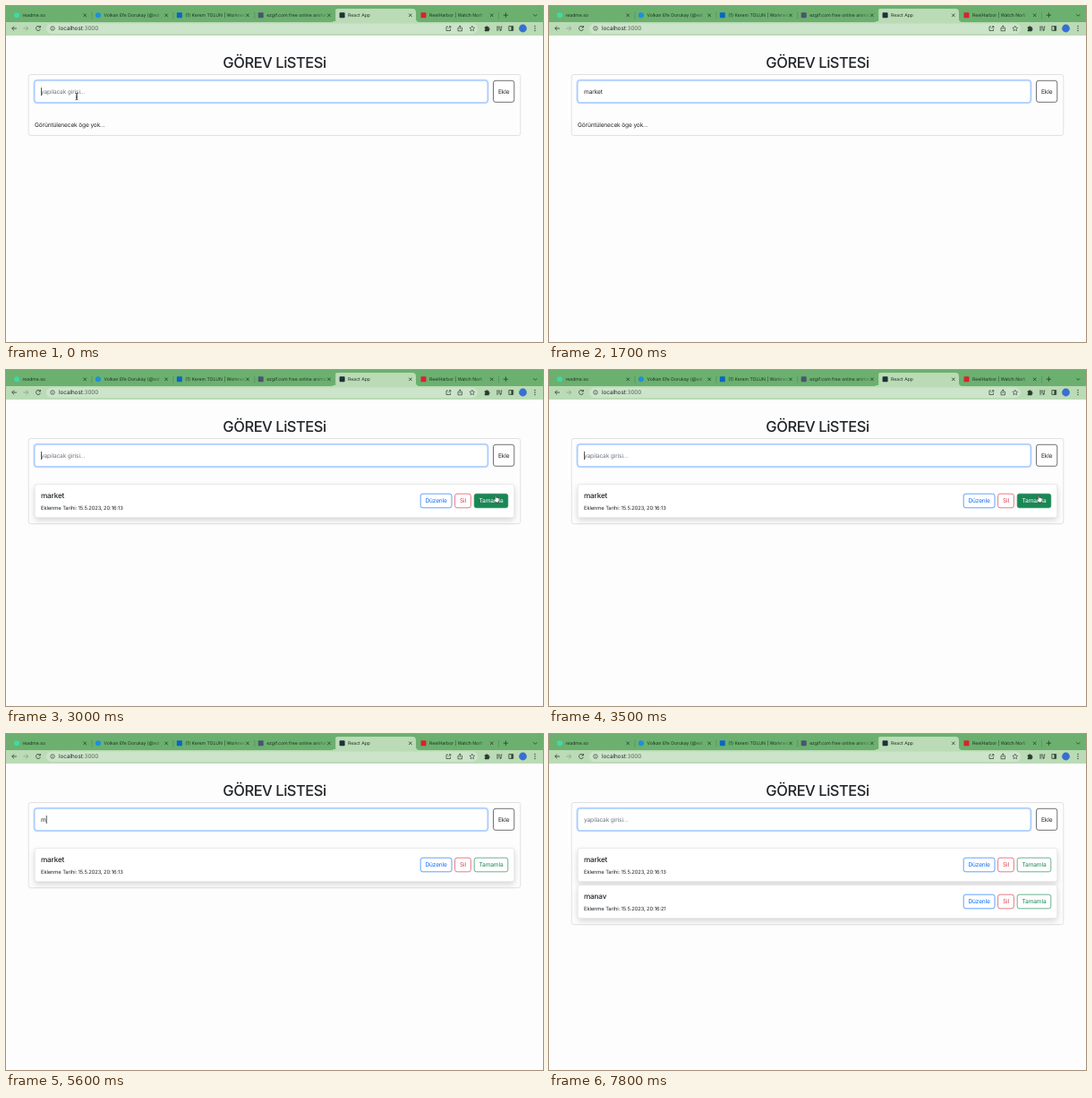
Write an HTML page that moves like this. It is 600 by 375 pixels and loops after 8000 ms.

```html
<!DOCTYPE html>
<html lang="tr">
<head>
<meta charset="utf-8">
<style>
html, body { margin: 0; height: 100%; overflow: hidden; background: #fdfdfd; }
svg { display: block; width: 100vw; height: 100vh; }
text { font: 6.6px Inter, "Open Sans", sans-serif; letter-spacing: -.022em; fill: #212529; text-rendering: geometricPrecision; white-space: pre; }
.tab { font-size: 5.1px; letter-spacing: 0; fill: #1d3020; }
.title { font-size: 16.5px; font-weight: 500; letter-spacing: -.028em; }
.task { font-size: 8.2px; font-weight: 500; }
.date { font-size: 5.85px; }
.mid { text-anchor: middle; }
.icon { fill: none; stroke: #2b3a2c; stroke-width: .8; }
.card { filter: drop-shadow(0 3.3px 3.3px rgba(0, 0, 0, .15)); }
</style>
</head>
<body>
<svg viewBox="0 0 600 375">
  <defs>
    <linearGradient id="fade"><stop stop-color="#6bb06f" stop-opacity="0"/><stop offset=".75" stop-color="#6bb06f"/></linearGradient>
  </defs>
  <rect width="600" height="375" fill="#fdfdfd"/>
  <rect width="600" height="18" fill="#6bb06f"/>
  <rect y="18" width="600" height="15" fill="#badbb6"/>
  <path d="M363 18q4 0 4-4V7q0-4 4-4H454q4 0 4 4v7q0 4 4 4z" fill="#badbb6"/>
  <g id="tabs"></g>
  <rect x="45" y="19.5" width="482" height="11.5" rx="5.75" fill="#cce4c9"/>
  <text x="59" y="27.4" style="font-size:6.4px;letter-spacing:-.01em">localhost<tspan fill="#5c6e5c">:3000</tspan></text>
  <g class="icon">
    <path d="M558.4 7.5v5.4M555.7 10.2h5.4M589.3 9.3l2 2 2-2"/>
    <path d="M12 25H6.7m2.4-2.4L6.7 25l2.4 2.4"/>
    <path d="M19.5 25h5.3m-2.4-2.4l2.4 2.4-2.4 2.4" stroke="#84a083"/>
    <path d="M38 23.4a2.5 2.5 0 1 0 .4 2.4M38.4 22v2h-2"/>
    <circle cx="52" cy="25" r="2.3" stroke-width=".6"/><path d="M52 24.6v1.8M52 23.4v.6" stroke-width=".6"/>
    <path d="M494 23h-2v4.5h4.5v-2M495 22.7h1.8v1.8M496.700 22.800l-2.500 2.500" stroke-width=".7"/>
    <path d="M506 24.200h-1v3.600h4.500v-3.600h-1M507.250 26v-4m-1.300 1.200l1.300-1.200 1.300 1.200" stroke-width=".7"/>
    <path d="M520.800 22.200l.9 1.900 2 .2-1.500 1.400.4 2-1.800-1-1.800 1 .4-2-1.500-1.400 2-.2z" stroke-width=".6"/>
    <path d="M535 23.500h1.300a.9.9 0 0 1 1.800 0h1.300v1.400a.9.9 0 0 1 0 1.800V28H535v-1.400a.8.8 0 0 0 0-1.600z" fill="#2b3a2c" stroke-width=".5"/>
    <path d="M548 23.200h4M548 25.100h4M548 27h2.300M553.200 27v-4h1.200"/><circle cx="552.400" cy="27" r=".6"/>
    <path d="M561.900 22.600h4.800v4.800h-4.800z"/><path d="M565.400 22.600v4.800" stroke-width="1.800"/>
    <path d="M591 22.500v.01M591 25v.01M591 27.500v.01" stroke-width="1.300" stroke-linecap="round"/>
  </g>
  <circle cx="577.500" cy="25" r="4.400" fill="#386fd0"/>

  <text class="title mid" x="300" y="69">GÖREV LiSTESi</text>
  <rect id="panel" x="25.200" y="76.500" width="549.600" rx="2.500" fill="none" stroke="#cfcfcf" stroke-width=".6"/>
  <rect x="32" y="83.200" width="506" height="24.500" rx="2.700" fill="#fff" stroke="#c2dbfe" stroke-width="3"/>
  <rect x="32" y="83.200" width="506" height="24.500" rx="2.700" fill="#fff" stroke="#86b7fe" stroke-width=".7"/>
  <text id="entry" x="39" y="98"></text>
  <rect id="caret" y="91" width=".7" height="9" fill="#111"/>
  <text id="empty" x="32" y="135">Görüntülenecek öge yok...</text>
  <g id="items"></g>
  <g id="buttons"></g>
  <g id="pointer" stroke-linejoin="round">
    <path id="beam" d="M-1.500-3.800q1.500 0 1.500 1.100V2.700q0 1.100-1.500 1.100M1.500-3.800Q0-3.800 0-2.700V2.700q0 1.100 1.500 1.100M-.8.800H.8" fill="none" stroke="#222" stroke-width=".7"/>
    <path id="arrow" d="M0 0V6.200L1.400 4.900l1 2.300 1-.4-1-2.200H4.300z" fill="#000" stroke="#fff" stroke-width=".5"/>
    <path id="hand" d="M-.6 3.800V.3q.6-.8 1.200 0V2.500q.8-.4 1.200.2.800-.3 1.200.3.900-.2 1 .6V5.500L3.300 7.800H0L-2.300 4.700q.5-1 1.700 0z" fill="#fff" stroke="#111" stroke-width=".5"/>
  </g>
</svg>
<script>
const LOOP = 8000, STEP = 100, BLINK = 265;
const $ = id => document.getElementById(id);
const show = (el, on) => el.setAttribute("visibility", on ? "visible" : "hidden");

const tabs = [
  ["readme.so", "#3fd9a8", 1],
  ["Volkan Efe Dorukay (@vol", "#1d8fe0", 1],
  ["(1) Kerem TOLUN | Worknes", "#0a66c2", 0],
  ["ezgif.com free online anima", "#4a5570", 0],
  ["React App", "#20303a", 0],
  ["ReelHarbor | Watch Nort", "#d8232f", 0]
];
$("tabs").innerHTML = tabs.map(([label, color, round], i) => {
  const x = 18.5 + 90.9 * i, active = i == 4;
  return `<rect x="${x - 9.5}" y="7.2" width="6" height="6" rx="${round ? 3 : .8}" fill="${color}"/>
    <text class="tab" x="${x}" y="12.1">${label}</text>
    ${active ? "" : `<rect x="${x + 53}" y="4" width="24" height="13" fill="url(#fade)"/>`}
    <path class="icon" d="M${x + 68} 8.6l3.400 3.400m0-3.400l-3.400 3.400"/>
    ${i == 3 || active ? "" : `<path d="M${x + 77.500} 6.500v8" stroke="#4d8a52" stroke-width=".6"/>`}`;
}).join("");

const buttons = [];
function addButton(x, y, w, h, color, label, since) {
  const g = document.createElementNS("http://www.w3.org/2000/svg", "g");
  g.innerHTML = `<rect x="${x}" y="${y}" width="${w}" height="${h}" rx="2.500" stroke="${color}" stroke-width=".65"/>
    <text class="mid" x="${x + w / 2}" y="${y + h / 2 + 2.400}">${label}</text>`;
  $("buttons").append(g);
  buttons.push({ g, x, y, w, h, color, since });
}
addButton(544.500, 83.300, 23.300, 24, "#212529", "Ekle", 0);

const items = [
  { name: "market", time: "20:16:13", since: 1735 },
  { name: "manav", time: "20:16:21", since: 6435 }
];
items.forEach((item, i) => {
  const y = 127.400 + 41 * i;
  $("items").insertAdjacentHTML("beforeend", `<g>
    <rect class="card" x="32.200" y="${y}" width="535.600" height="37.300" rx="2.500" fill="#fff" stroke="#d5d5d5" stroke-width=".5"/>
    <text class="task" x="39" y="${y + 15.500}">${item.name}</text>
    <text class="date" x="39" y="${y + 28.100}">Eklenme Tarihi: 15.5.2023, ${item.time}</text></g>`);
  item.g = $("items").lastElementChild;
  addButton(463.200, y + 10.800, 34.800, 15.600, "#0d6efd", "Düzenle", item.since);
  addButton(501.600, y + 10.800, 17.800, 15.600, "#dc3545", "Sil", item.since);
  addButton(523.200, y + 10.800, 37.600, 15.600, "#198754", "Tamamla", item.since);
});

// Key press times per word; each press restarts the caret blink.
const typing = [
  { word: "market", keys: [480, 700, 850, 1000, 1200, 1400], enter: 1735 },
  { word: "manav", keys: [5460, 5660, 5770, 6060, 6260], enter: 6435 }
];
const presses = [0, ...typing.flatMap(w => [...w.keys, w.enter])];
const typedAt = t => typing.map(({ word, keys, enter }) =>
  t < enter ? word.slice(0, keys.filter(k => k <= t).length) : "").join("");

const path = [
  [0, 79, 101], [300, 80, 103], [1800, 80, 103], [2250, 553, 97], [2500, 548.800, 107.700],
  [2750, 547, 140], [3600, 547, 140], [3850, 506, 142], [4100, 319, 92], [4400, 315, 100], [LOOP, 315, 100]
];
function pointerAt(t) {
  const i = path.findIndex(p => p[0] > t), [t0, x0, y0] = path[i - 1], [t1, x1, y1] = path[i];
  const u = (t - t0) / (t1 - t0), k = u * u * (3 - 2 * u);
  return [x0 + (x1 - x0) * k, y0 + (y1 - y0) * k];
}

function draw(t) {
  const count = items.filter(i => t >= i.since).length;
  items.forEach(i => show(i.g, t >= i.since));
  show($("empty"), !count);
  $("panel").setAttribute("height", count ? 54.200 + 41 * count : 68);

  const typed = typedAt(t), entry = $("entry");
  entry.textContent = typed || "yapilacak girisi...";
  entry.style.fill = typed ? "#212529" : "#6c757d";
  $("caret").setAttribute("x", 39.200 + (typed ? entry.getComputedTextLength() : 0));
  const last = Math.max(...presses.filter(p => p <= t));
  show($("caret"), Math.floor((t - last) / BLINK) % 2 == 0);

  const [x, y] = pointerAt(t);
  const visible = t < 480 || t >= 1900 && t < 5460;
  let over = false;
  for (const b of buttons) {
    const on = t >= b.since;
    const hover = on && visible && x > b.x && x < b.x + b.w && y > b.y && y < b.y + b.h;
    over ||= hover;
    show(b.g, on);
    b.g.firstElementChild.style.fill = hover ? b.color : "#fff";
    b.g.lastElementChild.style.fill = hover ? "#fff" : b.color;
  }
  const inField = x > 32 && x < 538 && y > 83 && y < 108;
  $("pointer").setAttribute("transform", `translate(${x} ${y})`);
  show($("beam"), visible && inField);
  show($("hand"), visible && over);
  show($("arrow"), visible && !inField && !over);
}

const start = performance.now();
function tick() {
  const t = (performance.now() - start) % LOOP;
  draw(Math.floor(t / STEP) * STEP);
  requestAnimationFrame(tick);
}
tick();
</script>
</body>
</html>
```
